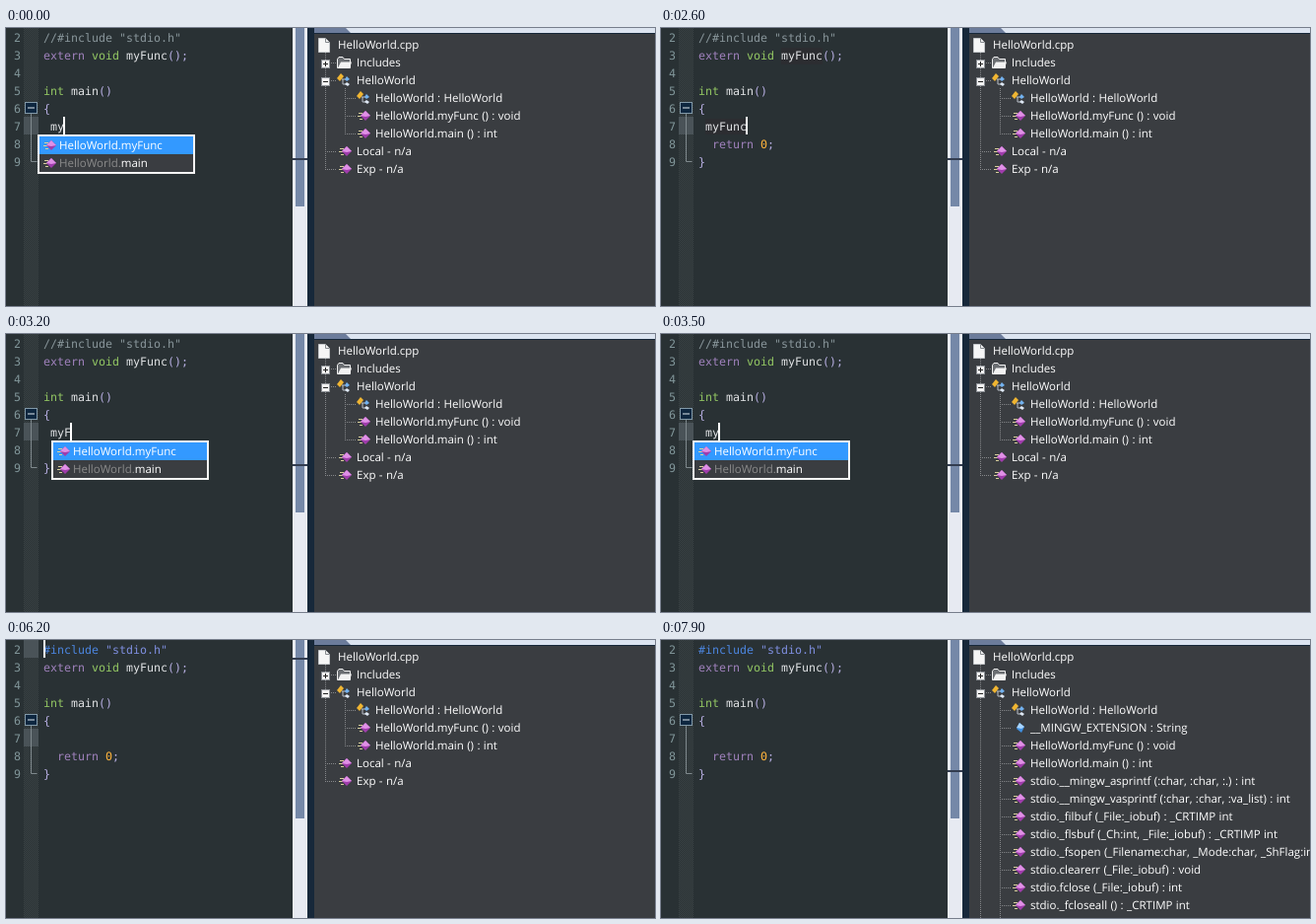
Recreate the animation shown at these times as an HTML page. Size 659 by 282 pixels, loop 8000 ms.

```html
<!DOCTYPE html>
<html lang="en">
<head>
<meta charset="utf-8">
<title>Code completion</title>
<style>
html, body { margin: 0; width: 100%; height: 100%; overflow: hidden; background: #293134; }
svg { display: block; width: 659px; height: 282px; }
text { white-space: pre; text-rendering: geometricPrecision; }
.code { font: 11.63px "DejaVu Sans Mono", monospace; fill: #e0e2e4; }
.ui { font: 11.5px "Open Sans", sans-serif; word-spacing: .4px; fill: #fff; }
.key { fill: #a082bd; }
.type { fill: #93c763; }
.op { fill: #b9b0e4; }
.num { fill: #ffb43c; }
.pre { fill: #4c86e0; }
.str { fill: #7f8fe0; }
.note { fill: #89969b; }
.count { fill: #81969a; }
.dim { fill: #8b8b8b; }
.dots { stroke: #85878a; stroke-dasharray: 1 1; fill: none; }
</style>
</head>
<body>
<svg id="stage" viewBox="0 0 659 282" xmlns="http://www.w3.org/2000/svg">
  <defs>
    <pattern id="checker" width="2" height="2" patternUnits="userSpaceOnUse">
      <path d="M0 0h2v2h-2z" fill="#293134"/>
      <path d="M0 0h1v1h-1zM1 1h1v1h-1z" fill="#3b4345"/>
    </pattern>
    <g id="method">
      <path d="M-7-2.5h4M-8 .5h4M-6 3.5h3" stroke="#d8cf9c"/>
      <path d="M0-5L5 0 0 5-5 0z" fill="#a03cac"/>
      <path d="M0-5L5 0 0 1-5 0z" fill="#e090e6"/>
    </g>
    <g id="field">
      <path d="M-1-5L4-1 1 5-4 1z" fill="#3f8fe0"/>
      <path d="M-1-5L4-1 1 1-4 0z" fill="#a8d4ff"/>
    </g>
    <g id="class">
      <path d="M-1-1h4M0-1v5h3" stroke="#b9c0c8" fill="none"/>
      <path d="M-2-7L1-4-3 1-6-2z" fill="#f0b532"/>
      <path d="M4-4L7-1 4 1 2-1z" fill="#72b2f0"/>
      <path d="M4 2L7 4 5 6 2 4z" fill="#dfe9f5"/>
    </g>
    <g id="folder">
      <path d="M-6.500 5.500v-9l1.500-2h4l1.500 2h6v9z" fill="#6b6e72" stroke="#f2f2f2"/>
      <path d="M-6 5.500l3-6h11l-2 6z" fill="#f2f2f2"/>
    </g>
    <g id="file">
      <path d="M-5.500-6.500h7l4 4v10h-11z" fill="#f6f6f6" stroke="#c4c7ca"/>
      <path d="M1.500-6.500v4h4" fill="none" stroke="#85898d"/>
    </g>
  </defs>
  <rect width="291" height="282" fill="#293134"/>
  <rect x="18" width="15" height="282" fill="url(#checker)"/>
  <g id="marks" fill="#4a5358"></g>
  <g id="numbers"></g>
  <path d="M25.500 87v48.500h6" fill="none" stroke="#7f898d"/>
  <rect x="19.500" y="75.500" width="12" height="11" fill="#0e2740" stroke="#8299a8"/>
  <path d="M22 81h7" stroke="#dfe8ee"/>
  <g id="code"></g>
  <rect id="caret" width="2" height="18" fill="#fff"/>
  <rect x="291" width="15" height="282" fill="#e7eaf2"/>
  <rect x="294" width="9" height="181" fill="#7588a8"/>
  <rect id="scrollMark" x="291" width="15" height="2" fill="#333d50"/>
  <rect x="306" width="7" height="282" fill="#17283a"/>
  <rect x="313" width="346" height="282" fill="#3a3d41"/>
  <rect x="313" width="346" height="6" fill="#17283a"/>
  <rect x="313" width="346" height="5" fill="#dce4f0"/>
  <path d="M313 0h32l5 5h-37z" fill="#6c7c9b"/>
  <g id="tree"></g>
  <g id="popup">
    <rect x="1" y="109" width="158" height="38" fill="#3a3d41" stroke="#f4f4f4" stroke-width="2"/>
    <rect x="2" y="110" width="156" height="18" fill="#3399ff"/>
    <use href="#method" x="14" y="119"/>
    <use href="#method" x="14" y="137"/>
    <text class="ui" x="22" y="123">HelloWorld.myFunc</text>
    <text class="ui" x="22" y="141"><tspan class="dim">HelloWorld.</tspan>main</text>
  </g>
</svg>
<script>
const LOOP = 8000;
const el = id => document.getElementById(id);
const lineTop = n => (n - 2) * 18;
const span = (cls, s) => `<tspan class="${cls}">${s}</tspan>`;
const codeText = (x, line, s) => `<text class="code" x="${x}" y="${lineTop(line) + 14}">${s}</text>`;

// Each step changes only the named parts of the state.
const start = { typed: "my", line: 7, x: 58, on: true, popup: 32, slashes: "//", saved: false, mark: 132 };
const steps = [
  [0, {}],
  [400, { on: false }],
  [700, { typed: "myf", x: 65, on: true, popup: 39 }],
  [1100, { on: false }],
  [1600, { on: true }],
  [1700, { typed: "myFunc", x: 86, popup: null }],
  [2100, { on: false }],
  [2600, { on: true }],
  [2900, { typed: "myFun", x: 79, popup: 60 }],
  [3000, { typed: "myFu", x: 72, popup: 53 }],
  [3200, { typed: "myF", x: 65, popup: 46 }],
  [3300, { popup: 39 }],
  [3500, { typed: "my", x: 58, popup: 32 }],
  [4000, { typed: "", x: 44, popup: null }],
  [4400, { on: false }],
  [4900, { on: true }],
  [5400, { on: false }],
  [5500, { line: 2, x: 51, on: true, mark: 18 }],
  [5900, { on: false }],
  [6100, { slashes: "/", x: 44, on: true }],
  [6200, { slashes: "", x: 38 }],
  [6500, { saved: true }],
  [6700, { on: false }],
  [7200, { on: true }],
  [7500, { line: 7, x: 44, mark: 132 }],
  [7900, { on: false }]
];
let last = start;
const states = steps.map(([, change]) => last = { ...last, ...change });

const members = ["HelloWorld : HelloWorld", "HelloWorld.myFunc () : void", "HelloWorld.main () : int"];
const included = [
  "stdio.__mingw_asprintf (:char, :char, :.) : int",
  "stdio.__mingw_vasprintf (:char, :char, :va_list) : int",
  "stdio._filbuf (_File:_iobuf) : _CRTIMP int",
  "stdio._flsbuf (_Ch:int, _File:_iobuf) : _CRTIMP int",
  "stdio._fsopen (_Filename:char, _Mode:char, _ShFlag:int) : _CRTIMP",
  "stdio.clearerr (_File:_iobuf) : void",
  "stdio.fclose (_File:_iobuf) : int",
  "stdio._fcloseall () : _CRTIMP int"
];

function node(icon, x, y, label, textX) {
  return `<use href="#${icon}" x="${x}" y="${y}"/><text class="ui" x="${textX}" y="${y + 4}">${label}</text>`;
}
function toggle(y, sign) {
  return `<rect x="320.500" y="${y - 2.5}" width="8" height="8" fill="#f4f4f4" stroke="#8d9196"/>
    <path d="${sign}" transform="translate(324.500 ${y + 1.5})" stroke="#222"/>`;
}
function treeMarkup(saved) {
  const rows = saved
    ? [members[0], "__MINGW_EXTENSION : String", ...members.slice(1), ...included]
    : members;
  const end = saved ? 282 : 143;
  const branchEnd = saved ? 282 : 107;
  let dots = `M324.500 25V${end}M324 35.500h12M324 53.500h12M344.500 61V${branchEnd}`;
  let nodes = node("file", 323, 17, "HelloWorld.cpp", 337)
    + node("folder", 343, 35, "Includes", 356)
    + node("class", 342, 53, "HelloWorld", 356);
  rows.forEach((label, i) => {
    const y = 71 + 18 * i;
    const icon = i === 0 ? "class" : saved && i === 1 ? "field" : "method";
    dots += `M344 ${y + .5}h11`;
    nodes += node(icon, icon === "class" ? 362 : 365, y, label, 375);
  });
  if (!saved) {
    dots += "M324 125.500h11M324 143.500h11";
    nodes += node("method", 346, 125, "Local - n/a", 356) + node("method", 346, 143, "Exp - n/a", 356);
  }
  return `<path class="dots" d="${dots}"/>` + nodes
    + toggle(35, "M-2.500 0h5M0-2.500v5") + toggle(53, "M-2.500 0h5");
}

function codeMarkup({ typed, slashes }) {
  const include = slashes === "//"
    ? span("note", '//#include "stdio.h"')
    : span("op", slashes) + span("pre", "#include ") + span("str", '"stdio.h"');
  const matches = typed === "myFunc"
    ? '<path d="M122 20h42v17h-42zM45 92h42v16h-42z" fill="#2c2d31"/>' : "";
  return matches
    + codeText(38, 2, include)
    + codeText(38, 3, span("key", "extern ") + span("type", "void") + " myFunc" + span("op", "();"))
    + codeText(38, 5, span("type", "int") + " main" + span("op", "()"))
    + codeText(38, 6, span("op", "{"))
    + codeText(45, 7, typed)
    + codeText(52, 8, span("key", "return ") + span("num", "0") + span("op", ";"))
    + codeText(38, 9, span("op", "}"));
}

function render(s) {
  const changed = s.saved ? [] : s.slashes === "//" ? [7] : [2, 7];
  el("marks").innerHTML = changed.map(n => `<rect x="18" y="${lineTop(n)}" width="15" height="18"/>`).join("");
  el("code").innerHTML = codeMarkup(s);
  el("tree").innerHTML = treeMarkup(s.saved);
  el("caret").setAttribute("x", s.x);
  el("caret").setAttribute("y", lineTop(s.line));
  el("caret").style.display = s.on ? "" : "none";
  el("scrollMark").setAttribute("y", s.mark);
  el("popup").style.display = s.popup === null ? "none" : "";
  el("popup").setAttribute("transform", `translate(${s.popup ?? 0} 0)`);
}

el("numbers").innerHTML = [2, 3, 4, 5, 6, 7, 8, 9].map(n => codeText(8, n, span("count", n))).join("");

const origin = performance.now();
let shown = -1;
function tick() {
  const t = (performance.now() - origin) % LOOP;
  const index = steps.findLastIndex(([at]) => at <= t);
  if (index !== shown) render(states[shown = index]);
  requestAnimationFrame(tick);
}
tick();
</script>
</body>
</html>
```
